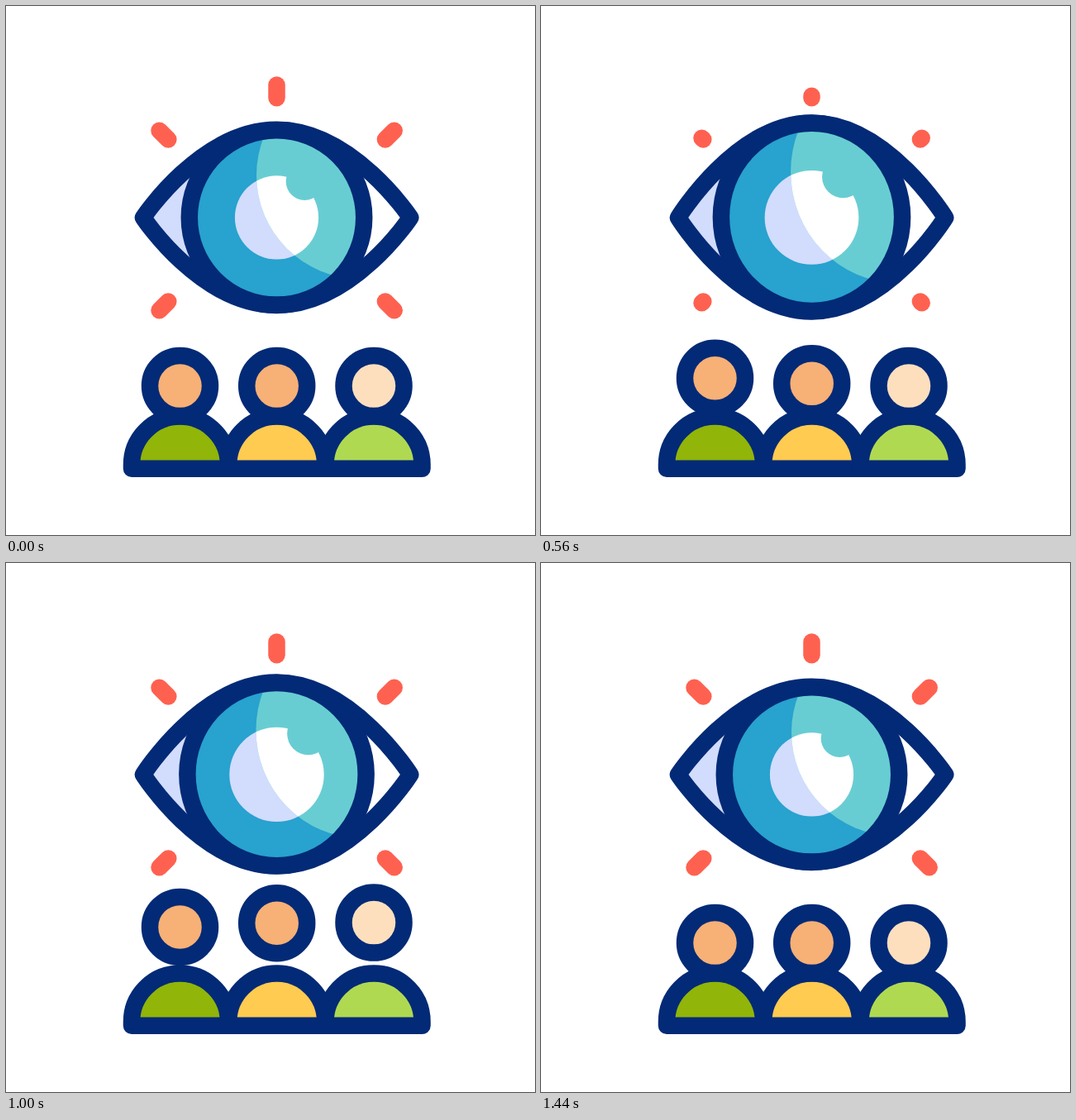
Recreate the animation shown at these times as an HTML page. Size 640 px wide and 640 px high, loop 1480 ms.

```html
<!DOCTYPE html>
<html lang="en">
<head>
<meta charset="utf-8">
<title>Eye and people</title>
<style>
  html, body { margin: 0; width: 100%; height: 100%; overflow: hidden; background: #fff; }
  svg { display: block; width: 100vw; height: 100vh; }
  .line { stroke: #032a76; stroke-width: 20.5; stroke-linejoin: round; }
  .ray { stroke: #ff6150; stroke-width: 20.5; stroke-linecap: round; }
</style>
</head>
<body>
<svg viewBox="0 0 640 640">
  <defs>
    <clipPath id="shine"><ellipse id="shineShape"/></clipPath>
    <clipPath id="leftHalf"><path d="M0 0H327.5V640H0Z"/></clipPath>
  </defs>
  <g id="rays"></g>
  <path class="lens" fill="#fff"/>
  <path class="lens" fill="#d2dcfd" clip-path="url(#leftHalf)"/>
  <path class="lens line" fill="none"/>
  <ellipse class="iris" fill="#28a2ce"/>
  <circle class="pupil" fill="#d2dcfd"/>
  <g clip-path="url(#shine)">
    <ellipse class="iris" fill="#68cdd2"/>
    <circle class="pupil" fill="#fff"/>
    <circle id="glint" fill="#68cdd2"/>
  </g>
  <ellipse class="iris line" fill="none"/>
  <g id="people"></g>
</svg>
<script>
const LOOP = 1480, STEP = 40;
const RISE = 396, HOLD = 92;
const CX = 327.5, CY = 255.9;

const $ = id => document.getElementById(id);

function add(parent, tag, attrs) {
  const el = document.createElementNS('http://www.w3.org/2000/svg', tag);
  set(el, attrs);
  parent.append(el);
  return el;
}

function set(el, attrs) {
  for (const key in attrs) el.setAttribute(key, attrs[key]);
}

function setAll(selector, attrs) {
  document.querySelectorAll(selector).forEach(el => set(el, attrs));
}

// Eased progress from 0 to 1
function ease(t, start, length) {
  const u = Math.min(1, Math.max(0, (t - start) / length));
  return u * u * (3 - 2 * u);
}

// Out, short pause, back
const swell = (t, start) =>
  ease(t, start, RISE) - ease(t, start + RISE + HOLD, RISE);

// Inner end to outer end
const rays = [
  [327.5, 111.3, 327.5, 95.6],
  [196.3, 161.6, 185.5, 150.8],
  [458.9, 161.6, 469.7, 150.8],
  [196.3, 357.4, 185.5, 368.2],
  [458.9, 357.4, 469.7, 368.2]
].map(ends => ({ ends, el: add($('rays'), 'line', { class: 'ray' }) }));

const people = [
  { x: 210.5, skin: '#f7b076', shirt: '#91b508', start: 393 },
  { x: 327.7, skin: '#f7b076', shirt: '#ffcb50', start: 477 },
  { x: 445, skin: '#fddfbe', shirt: '#b0d952', start: 563 }
];
for (const p of people) {
  add($('people'), 'path', {
    class: 'line', fill: p.shirt,
    d: `M${p.x - 58.5} 559.7V555a58.5 58.5 0 0 1 117 0V559.7Z`
  });
}
for (const p of people) {
  p.head = add($('people'), 'circle', { class: 'line', fill: p.skin, cx: p.x, r: 36.5 });
}

function drawRays(t) {
  const from = ease(t, 57, RISE), regrow = ease(t, 490, 270);
  const [a, b] = t < 480 ? [from, 1] : [0, regrow];
  for (const { ends: [x1, y1, x2, y2], el } of rays) {
    const at = k => [x1 + (x2 - x1) * k, y1 + (y2 - y1) * k];
    const [p, q] = [at(a), at(b)];
    set(el, {
      x1: p[0], y1: p[1], x2: q[0], y2: q[1],
      visibility: b - a > 0.004 ? 'visible' : 'hidden'
    });
  }
}

function drawEye(t) {
  const open = swell(t, 301);
  const cy = CY - 0.7 * open;
  const top = cy - 106.1 - 10.9 * open;
  const bottom = cy + 106.1 + 10.9 * open;
  setAll('.lens', {
    d: `M166 256C166 256 236 ${top} ${CX} ${top}S489.2 256 489.2 256` +
       `S419 ${bottom} ${CX} ${bottom}S166 256 166 256Z`
  });

  const rx = 105.7 + 5.4 * open, ry = 105.7 + 10.9 * open;
  setAll('.iris', { cx: CX, cy, rx, ry });
  const sx = rx / 105.7, sy = ry / 105.7;
  set($('shineShape'), {
    cx: CX + 100.5 * sx, cy: cy - 51 * sy, rx: 125 * sx, ry: 125 * sy
  });

  const r = 50.6 + 10.9 * swell(t, 342), s = r / 50.6;
  setAll('.pupil', { cx: CX, cy: CY, r });
  set($('glint'), { cx: CX + 33.8 * s, cy: CY - 43.6 * s, r: 22.6 * s });
}

function draw(now) {
  const t = Math.floor(now % LOOP / STEP) * STEP;
  drawRays(t);
  drawEye(t);
  for (const p of people) p.head.setAttribute('cy', 459.6 - 24.5 * swell(t, p.start));
}

let begin;
function tick(now) {
  begin ??= now;
  draw(now - begin);
  requestAnimationFrame(tick);
}
draw(0);
requestAnimationFrame(tick);
</script>
</body>
</html>
```
